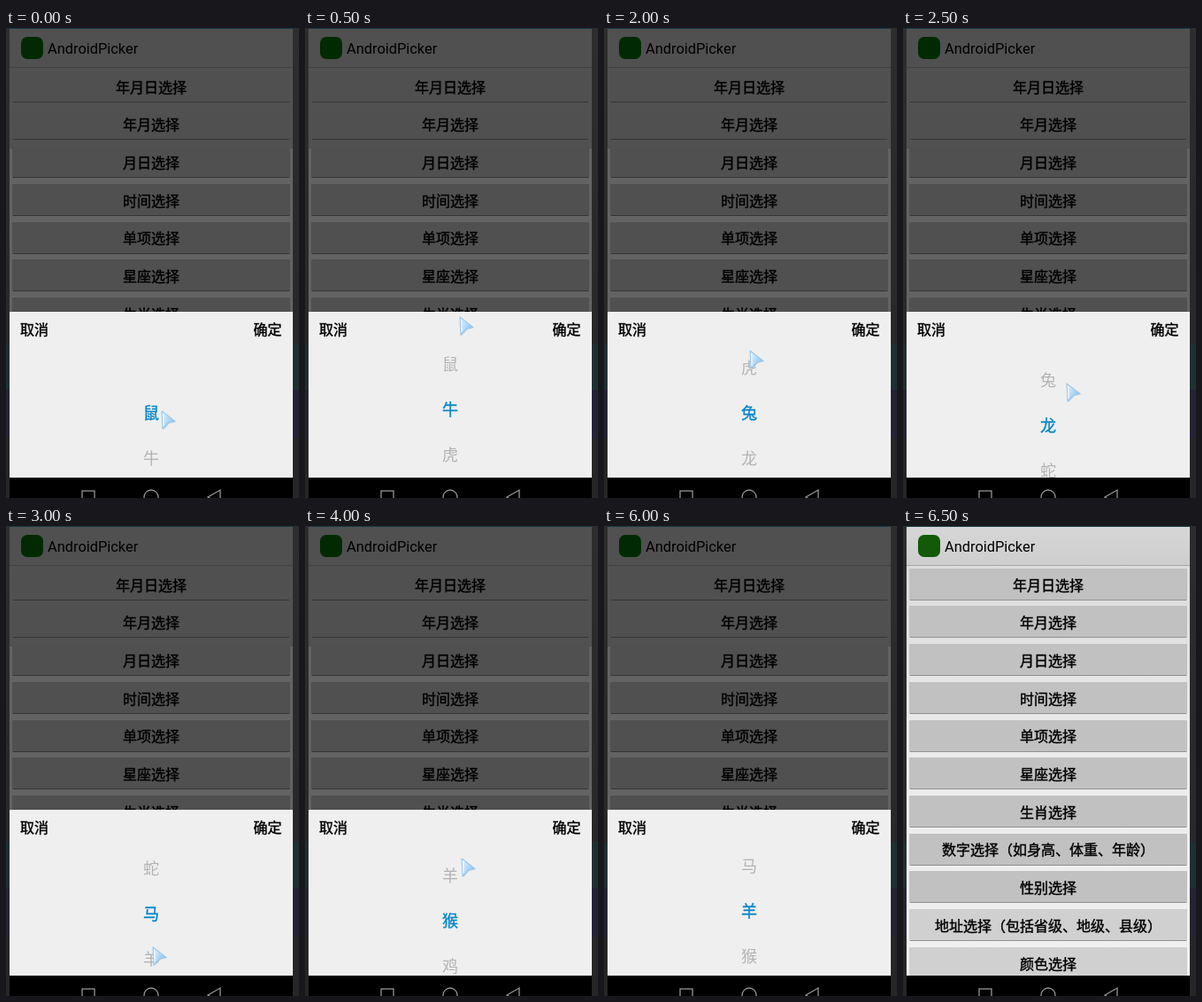
An HTML page that plays this animation: 331 by 530 pixels, repeating every 7 s.

```html
<!DOCTYPE html>
<html lang="zh-CN">
<head>
<meta charset="utf-8">
<style>
  html, body { margin: 0; width: 100%; height: 100%; overflow: hidden; background: #2a2a2a; }
  svg { display: block; width: 331px; height: 530px; }
  text { font-family: "Noto Sans CJK SC", "Noto Sans CJK", sans-serif; font-size: 16px; font-weight: 500; stroke: #000; stroke-width: .4px; }
  .mid { text-anchor: middle; }
  .title { font: 400 16.4px Roboto, sans-serif; stroke: none; }
  .row { font-size: 18px; font-weight: 400; fill: #b3b3b3; stroke: none; }
  .row.on { fill: #0a86c6; stroke: #0a86c6; }
  .nav { fill: none; stroke: #949494; stroke-width: 1.3; }
</style>
</head>
<body>
<svg viewBox="0 0 331 530">
  <defs>
    <linearGradient id="side" x2="0" y2="1">
      <stop offset="0" stop-color="#2d2d2d"/><stop offset="1" stop-color="#282828"/>
    </linearGradient>
    <linearGradient id="ice" x2="1" y2=".6">
      <stop offset="0" stop-color="#e6f4ff"/><stop offset=".45" stop-color="#bfdff8"/><stop offset="1" stop-color="#86bdec"/>
    </linearGradient>
    <linearGradient id="barLit" x2="0" y2="1">
      <stop offset="0" stop-color="#d6d6d6"/><stop offset="1" stop-color="#cecece"/>
    </linearGradient>
    <linearGradient id="pageLit" x2="0" y2="1">
      <stop offset="0" stop-color="#d8d8d8"/><stop offset=".5" stop-color="#ebebeb"/><stop offset="1" stop-color="#f0f0f0"/>
    </linearGradient>
    <clipPath id="screen"><rect x="4" y="1" width="320" height="506"/></clipPath>
    <clipPath id="wheelArea"><rect x="4" y="358" width="320" height="149"/></clipPath>
  </defs>

  <rect width="331" height="356" fill="url(#side)"/>
  <rect y="356" width="331" height="52" fill="#1f3032"/>
  <rect y="408" width="331" height="55" fill="#242336"/>
  <rect y="463" width="331" height="67" fill="#262626"/>
  <rect x="4" width="320" height="1" fill="#17384a"/>
  <rect x="4" y="507" width="320" height="23" fill="#000"/>
  <g class="nav">
    <rect x="86" y="522" width="14" height="14"/>
    <circle cx="164" cy="529" r="8"/>
    <path d="M242 521 V537 L228 529 Z"/>
  </g>

  <g id="lit" clip-path="url(#screen)"></g>
  <g id="dim" clip-path="url(#screen)"></g>

  <g id="sheet">
    <rect x="4" y="320" width="320" height="187" fill="#efefef"/>
    <text x="16" y="345.5">取消</text>
    <text x="279.5" y="345.5">确定</text>
    <g id="wheel" clip-path="url(#wheelArea)"></g>
  </g>
  <g id="cursor" stroke-linejoin="round">
    <path d="M2 2 L17 13 L9.5 15 L3 22 Z" fill="#8aa4ba" opacity=".45"/>
    <path d="M1 1 L16 12.5 L8.5 14 L2 21 Z" fill="url(#ice)" stroke="#9ccaf0" stroke-width="1.2"/>
    <path d="M2.6 4 L3 17.5" fill="none" stroke="#fff" stroke-width="1.3" opacity=".8"/>
  </g>
</svg>
<script>
const $ = id => document.getElementById(id);
const labels = ['年月日选择', '年月选择', '月日选择', '时间选择', '单项选择', '星座选择', '生肖选择',
  '数字选择（如身高、体重、年龄）', '性别选择', '地址选择（包括省级、地级、县级）', '颜色选择'];
const animals = [...'鼠牛虎兔龙蛇马羊猴鸡狗猪'];
const rowHeight = 51;

const themes = {
  lit: { page: 'url(#pageLit)', top: 'none', bar: 'url(#barLit)', rule: '#a6a6a6', button: '#c1c1c1',
         pale: '#d0d0d0', edge: '#909090', icon: '#125a08' },
  dim: { page: '#636363', top: '#515151', bar: '#505050', rule: '#414141', button: '#505050',
         pale: '#505050', edge: '#363636', icon: '#022a02' }
};

const rect = (x, y, w, h, fill, rx = 0) =>
  `<rect x="${x}" y="${y}" width="${w}" height="${h}" rx="${rx}" fill="${fill}"/>`;

function drawPage(id) {
  const c = themes[id];
  const buttons = labels.map((label, i) => {
    const y = 48.25 + 42.7 * i;
    const top = Math.floor(y);
    return rect(7, top, 314, 36, i > 8 ? c.pale : c.button, 1) +
      rect(8, top + 35, 312, 1, c.edge) +
      `<text class="mid" x="164" y="${y + 24.25}">${label}</text>`;
  });
  $(id).innerHTML = rect(4, 1, 320, 506, c.page) + rect(4, 45, 320, 91, c.top) +
    rect(4, 1, 320, 43, c.bar) + rect(4, 44, 320, 1, c.rule) +
    rect(17, 10, 25, 25, c.icon, 7) + '<text class="title" x="47" y="29">AndroidPicker</text>' +
    buttons.join('');
}
Object.keys(themes).forEach(drawPage);

$('wheel').innerHTML = animals.map(a => `<text class="row mid" x="164">${a}</text>`).join('');
const rows = [...$('wheel').children];

// One step per 500 ms: selected animal, its centre y, pointer x and y.
const steps = [
  ['鼠', 435, 175, 431],
  ['牛', 431, 174, 325],
  ['虎', 439, 181, 350],
  ['虎', 435, 150, 476],
  ['兔', 435, 164, 363],
  ['龙', 449, 184, 400],
  ['马', 438, 165, 474],
  ['羊', 449, 176, 375],
  ['猴', 446, 176, 374],
  ['鸡', 449, 177, 356],
  ['猴', 432, 185, 440],
  ['羊', 435, 292, 351],
  ['羊', 435],
  null
];
const stepTime = 500;
let shown = -1;

function show(index) {
  const step = steps[index];
  const open = step !== null;
  $('dim').style.display = $('sheet').style.display = open ? '' : 'none';
  const [animal, centre, x, y] = step || [];
  $('cursor').style.display = x === undefined ? 'none' : '';
  if (!open) return;
  const selected = animals.indexOf(animal);
  rows.forEach((row, i) => {
    row.setAttribute('y', centre + (i - selected) * rowHeight + 5.8);
    row.classList.toggle('on', i === selected);
    row.style.display = Math.abs(i - selected) > 1 ? 'none' : '';
  });
  if (x !== undefined) $('cursor').setAttribute('transform', `translate(${x} ${y})`);
}

const start = performance.now();
function tick() {
  const index = Math.floor((performance.now() - start) / stepTime) % steps.length;
  if (index !== shown) show(shown = index);
  requestAnimationFrame(tick);
}
tick();
</script>
</body>
</html>
```
